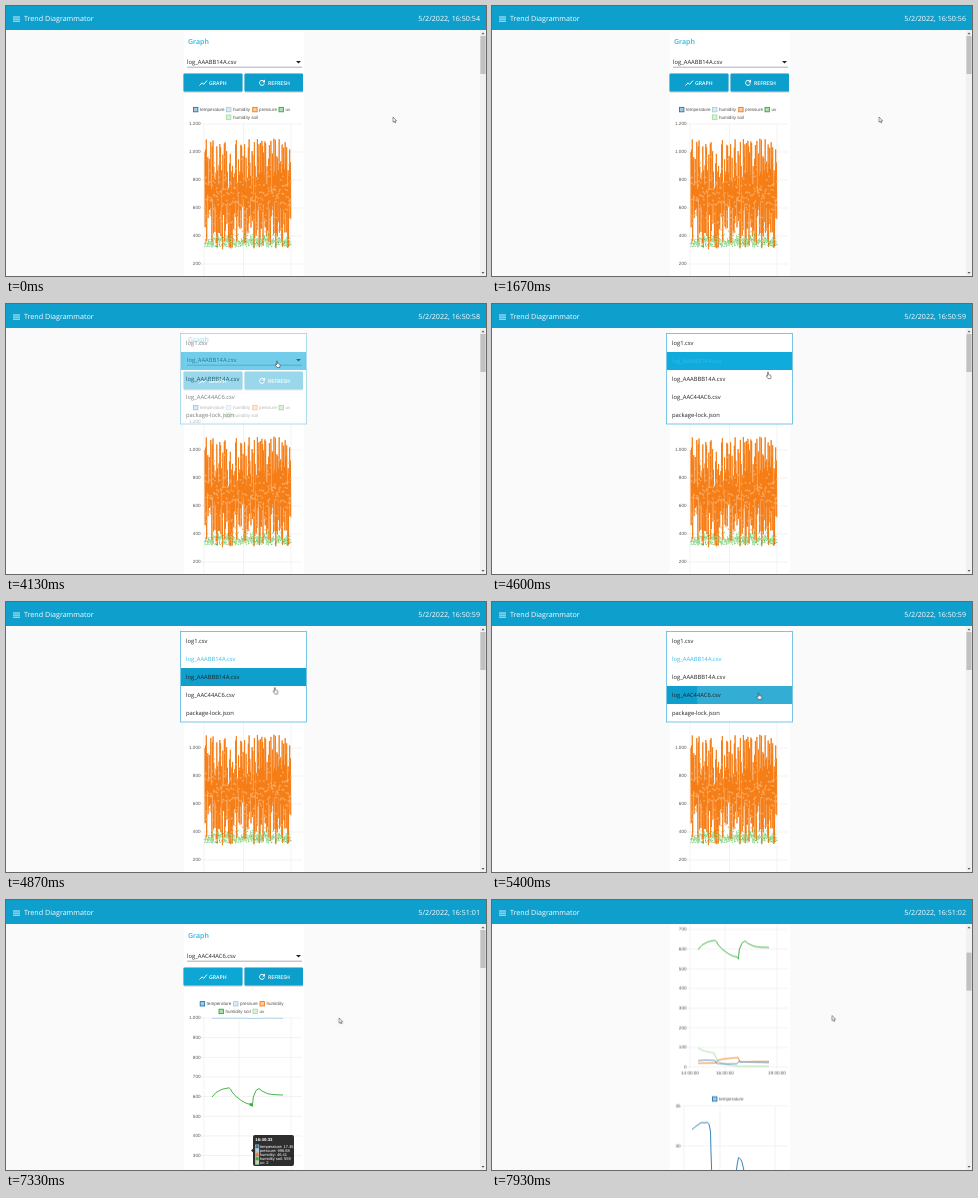
An HTML page for the animation above (8 s loop, 480 by 270 pixels).

```html
<!DOCTYPE html>
<html lang="en">
<head>
<meta charset="utf-8">
<title>Trend Diagrammator</title>
<style>
html, body { margin: 0; width: 480px; height: 270px; overflow: hidden; background: #fafafa; }
svg { display: block; overflow: hidden; }
text { font-family: "Open Sans", "Noto Sans", sans-serif; text-rendering: geometricPrecision; }
.bar { font-size: 7.15px; fill: #fff; }
.file { font-size: 5.8px; fill: #222; }
.btn { font-size: 5.2px; font-weight: 600; fill: #fff; }
.chart text { font: 4.6px "Liberation Sans", Arial, sans-serif; fill: #555; }
.chart .tip text { font-size: 4px; fill: #fff; }
.chart .tip .head { font-weight: bold; font-size: 4.3px; }
.grid { stroke: #e4e4e4; stroke-width: .5; fill: none; }
.line { fill: none; stroke-width: .9; stroke-linejoin: round; vector-effect: non-scaling-stroke; }
.icon { fill: none; stroke: #fff; stroke-width: 1; }

.clock, .menu, .mark, .before, .after, .first, .second, .oldName, .newName, .tip, .rise,
.page, .thumb, .pointer, .arrow, .hand, .graphBtn, .refreshBtn, .ripple, .rowRipple {
  animation-duration: 8s; animation-iteration-count: infinite; animation-timing-function: linear;
}
.clock { animation-name: clock; animation-timing-function: step-end; }
.before, .oldName { animation-name: before; animation-timing-function: step-end; }
.after { animation-name: after; animation-timing-function: step-end; }
.oldName { animation-name: oldName; }
.newName { animation-name: newName; animation-timing-function: step-end; }
.arrow { animation-name: arrow; animation-timing-function: step-end; }
.hand { animation-name: hand; animation-timing-function: step-end; }
.mark { animation-name: mark; animation-timing-function: step-end; }
.menu { animation-name: menu; }
.tip { animation-name: tip; }
.rise { animation-name: rise; transform-origin: 0 314.5px; }
.page { animation-name: page; }
.thumb { animation-name: thumb; }
.pointer { animation-name: pointer; }
.graphBtn { animation-name: graphBtn; }
.refreshBtn { animation-name: refreshBtn; }
.ripple { animation-name: ripple; transform-origin: 214px 76px; }
.rowRipple { animation-name: rowRipple; transform-origin: 267px 92px; }

@keyframes clock {
  0% { transform: translateY(0); }
  8.375% { transform: translateY(-24px); }
  20.875% { transform: translateY(-48px); }
  33.375% { transform: translateY(-72px); }
  45.875% { transform: translateY(-96px); }
  57.125% { transform: translateY(-120px); }
  70.875% { transform: translateY(-144px); }
  87.5% { transform: translateY(-168px); }
  95.875%, 100% { transform: translateY(-192px); }
}
@keyframes before { 0% { opacity: 1; } 83.4%, 100% { opacity: 0; } }
@keyframes after { 0% { opacity: 0; } 83.4%, 100% { opacity: 1; } }
@keyframes oldName { 0% { opacity: 1; } 68.75%, 100% { opacity: 0; } }
@keyframes newName { 0% { opacity: 0; } 68.75%, 100% { opacity: 1; } }
@keyframes arrow { 0% { opacity: 1; } 38% { opacity: 0; } 87%, 100% { opacity: 1; } }
@keyframes hand { 0% { opacity: 0; } 38% { opacity: 1; } 87%, 100% { opacity: 0; } }
@keyframes mark {
  0% { transform: translateY(0); fill: #0eabdc; }
  57.75% { transform: translateY(18px); fill: #0f9fcd; }
  61.6%, 100% { transform: translateY(36px); fill: #0f9fcd; }
}
@keyframes menu {
  0%, 50.4% { opacity: 0; } 52.5%, 68.75% { opacity: 1; } 71.2%, 100% { opacity: 0; }
}
@keyframes tip { 0%, 87.6% { opacity: 0; } 89%, 91.8% { opacity: 1; } 93.5%, 100% { opacity: 0; } }
@keyframes rise {
  0%, 83.4% { transform: scaleY(0); animation-timing-function: cubic-bezier(.165, .84, .44, 1); }
  91.5%, 100% { transform: scaleY(1); }
}
@keyframes page {
  0%, 93.4% { transform: translateY(0); animation-timing-function: cubic-bezier(.3, .3, .4, 1); }
  99.125% { transform: translateY(-147.5px); }
  100% { transform: translateY(-148.5px); }
}
@keyframes thumb {
  0%, 93.4% { transform: translateY(0); animation-timing-function: cubic-bezier(.3, .3, .4, 1); }
  99.125%, 100% { transform: translateY(22.6px); }
}
@keyframes pointer {
  0%, 32.5% { transform: translate(387px, 111px); animation-timing-function: ease-in-out; }
  39.2%, 45.9% { transform: translate(280px, 79px); animation-timing-function: ease-in-out; }
  49.2%, 56.5% { transform: translate(271px, 57px); }
  57.5% { transform: translate(276px, 68px); animation-timing-function: ease-out; }
  63.4%, 70% { transform: translate(266.5px, 91px); animation-timing-function: ease-in-out; }
  77.4%, 86% { transform: translate(214px, 75px); }
  88.4% { transform: translate(246px, 102px); animation-timing-function: ease-out; }
  91.6% { transform: translate(333px, 118px); }
  93.5%, 100% { transform: translate(340px, 115.5px); }
}
@keyframes refreshBtn {
  0%, 38.2% { fill: #109fcc; } 39.6%, 46.2% { fill: #14aedf; } 47.6%, 100% { fill: #109fcc; }
}
@keyframes graphBtn {
  0%, 76% { fill: #109fcc; } 77.4%, 87% { fill: #14aedf; } 89%, 100% { fill: #11a7d6; }
}
@keyframes ripple {
  0%, 77% { transform: scale(0); opacity: .28; }
  79% { transform: scale(1); opacity: .2; }
  83.4%, 100% { transform: scale(1); opacity: 0; }
}
@keyframes rowRipple {
  0%, 66.2% { transform: scale(0); opacity: .2; }
  68.2% { transform: scale(1); opacity: .13; }
  71%, 100% { transform: scale(1); opacity: 0; }
}
</style>
</head>
<body>
<svg width="480" height="270" viewBox="0 0 480 270">
  <defs>
    <clipPath id="graphClip"><rect x="177.5" y="67.5" width="59" height="18" rx="1"/></clipPath>
    <clipPath id="rowClip"><rect x="175" y="84" width="125" height="18"/></clipPath>
    <filter id="soft" x="-10%" y="-20%" width="120%" height="150%">
      <feDropShadow dx="0" dy=".6" stdDeviation=".7" flood-opacity=".35"/>
    </filter>
  </defs>
  <rect width="480" height="270" fill="#fafafa"/>

  <g class="page">
    <rect x="178" y="26" width="120" height="500" fill="#fff"/>
    <text x="182" y="38.3" font-size="7" font-weight="600" fill="#27b6e2">Graph</text>
    <text class="file oldName" x="181" y="58.2">log_AAABB14A.csv</text>
    <text class="file newName" x="181" y="58.2">log_AAC44AC6.csv</text>
    <path d="M181 61.2H296" stroke="#777" stroke-width=".6"/>
    <path d="M290 55h5l-2.5 2.6z" fill="#222"/>

    <g filter="url(#soft)">
      <rect class="graphBtn" x="177.5" y="67.5" width="59" height="18" rx="1"/>
      <rect class="refreshBtn" x="238.5" y="67.5" width="58.5" height="18" rx="1"/>
    </g>
    <g clip-path="url(#graphClip)"><circle class="ripple" cx="214" cy="76" r="42" fill="#fff"/></g>
    <path class="icon" d="M193.5 79.5l2.6-2.7 1.6 1.6 3.3-3.8"/>
    <text class="btn" x="203" y="78.6">GRAPH</text>
    <path class="icon" d="M257.9 75.2a2.5 2.5 0 1 0 .5 2.4"/>
    <path d="M259 73.6v2.8h-2.8z" fill="#fff"/>
    <text class="btn" x="262" y="78.6">REFRESH</text>

    <g class="chart before" id="before"></g>
    <g class="chart after" id="after">
      <g class="rise" id="rise"></g>
    </g>
  </g>

  <g class="menu">
    <rect x="174.5" y="29.5" width="126" height="90.5" fill="#fff" stroke="#58b9dc" stroke-width=".8"/>
    <rect class="mark" x="175" y="48" width="125" height="18"/>
    <g clip-path="url(#rowClip)"><circle class="rowRipple" cx="267" cy="92" r="95" fill="#fff"/></g>
    <g id="files"></g>
  </g>

  <rect x="474" y="24" width="6" height="246" fill="#f1f1f1"/>
  <rect class="thumb" x="474.4" y="30" width="5.2" height="38" fill="#c1c1c1"/>
  <path d="M475.5 28.3h3l-1.5-1.8zM475.5 266h3l-1.5 1.8z" fill="#555"/>

  <rect width="480" height="24" fill="#0f9fcd"/>
  <path d="M7 11h7M7 13.1h7M7 15.2h7" stroke="#fff" stroke-width=".8"/>
  <text class="bar" x="18" y="15.1">Trend Diagrammator</text>
  <svg x="400" width="80" height="24"><g class="clock" id="clock"></g></svg>

  <g class="pointer">
    <path class="arrow" d="M0 0v5.2l1.2-1.1.8 1.9.8-.4-.8-1.8h1.6z" fill="#fff" stroke="#333" stroke-width=".5"/>
    <path class="hand" d="M-.5 .2q.5-.6 1 0V2.6l2 .5q.7.2.6 1L2.7 6.5H.1L-1.7 4.1q0-.8.8-.4l.4.4z" fill="#fff" stroke="#222" stroke-width=".5"/>
  </g>
</svg>

<script>
const NS = "http://www.w3.org/2000/svg";
const $ = id => document.getElementById(id);
const BLUE = "#1f78b4", PALE_BLUE = "#a6cee3", ORANGE = "#f57c14", GREEN = "#35ac34", PALE_GREEN = "#a5dfa0";

function add(parent, tag, attrs, label) {
  const node = document.createElementNS(NS, tag);
  for (const key in attrs) node.setAttribute(key, attrs[key]);
  if (label !== undefined) node.textContent = label;
  parent.appendChild(node);
  return node;
}

function legend(parent, x, y, color, label) {
  add(parent, "rect", { x, y: y - 2.2, width: 4.4, height: 4.4, fill: color, "fill-opacity": .4, stroke: color, "stroke-width": .9 });
  add(parent, "text", { x: x + 6.4, y: y + 1.6 }, label);
}

function axes(parent, left, top, step, labels, columns, bottom) {
  labels.forEach((label, i) => {
    const y = top + i * step;
    add(parent, "path", { class: "grid", d: `M${left - 3} ${y}H296` });
    add(parent, "text", { x: left - 3.5, y: y + 1.4, "text-anchor": "end" }, label);
  });
  for (const x of [left, ...columns])
    add(parent, "path", { class: "grid", d: `M${x} ${top}V${bottom}` });
}

const polyline = (parent, color, points) =>
  add(parent, "polyline", { class: "line", stroke: color, points });

// Clock and file list
for (let i = 0; i < 9; i++) {
  const s = 54 + i, time = `16:${50 + Math.floor(s / 60)}:${String(s % 60).padStart(2, "0")}`;
  add($("clock"), "text", { class: "bar", x: 74, y: 15.1 + 24 * i, "text-anchor": "end" }, `5/2/2022, ${time}`);
}
["log1.csv", "log_AAABB14A.csv", "log_AAABBB14A.csv", "log_AAC44AC6.csv", "package-lock.json"].forEach((name, i) => {
  const row = add($("files"), "text", { class: "file", x: 180, y: 41.2 + 18 * i }, name);
  if (i === 1) row.style.fill = "#35bde8";
});

// Dense first chart
let seed = 11;
const rand = () => (seed = (seed * 16807) % 2147483647) / 2147483647;
const before = $("before");
legend(before, 187.5, 103.6, BLUE, "temperature");
legend(before, 220.5, 103.6, PALE_BLUE, "humidity");
legend(before, 246.7, 103.6, ORANGE, "pressure");
legend(before, 273, 103.6, GREEN, "uv");
legend(before, 220.5, 111.2, PALE_GREEN, "humidity soil");
axes(before, 198, 118, 28, ["1.200", "1.000", "800", "600", "400", "200"], [237.5, 285], 286);

const oldY = v => 286 - v * .14;
const spread = (n, value) => Array.from({ length: n }, (_, i) => [198.8 + 86 * i / (n - 1), oldY(value())]);
const dots = (points, color, r, opacity) =>
  points.forEach(([cx, cy]) => add(before, "circle", { cx, cy, r, fill: color, opacity }));
const soil = spread(170, () => 320 + 65 * rand() + 35 * rand() ** 4);
const uv = spread(170, () => 325 + 90 * rand() ** 1.5);
polyline(before, PALE_GREEN, soil.join(" "));
let high = false;
const pressure = spread(230, () => {
  high = !high;
  return high ? 1095 - 420 * rand() ** 1.5 : 305 + 420 * rand() ** 1.2;
});
polyline(before, ORANGE, pressure.join(" "));
dots(spread(240, () => 390 + 580 * (rand() + rand()) / 2), "#fbb06c", .95, .8);
dots(uv, GREEN, .5, .75);
dots(soil, PALE_GREEN, .55, .7);

// Second chart
const after = $("after"), rise = $("rise");
legend(after, 194.2, 103.8, BLUE, "temperature");
legend(after, 227.6, 103.8, PALE_BLUE, "pressure");
legend(after, 254, 103.8, ORANGE, "humidity");
legend(after, 213, 111.4, GREEN, "humidity soil");
legend(after, 247, 111.4, PALE_GREEN, "uv");
axes(after, 198, 118, 19.65, ["1.000", "900", "800", "700", "600", "500", "400", "300", "200", "100", "0"], [233, 285], 317);
[[198, "14:00:00"], [233, "16:00:00"], [285, "19:00:00"]].forEach(([x, label]) =>
  add(after, "text", { x, y: 322, "text-anchor": "middle" }, label));
after.appendChild(rise);

polyline(rise, PALE_GREEN, "206,295.5 212,298.5 222,300.5 225,307.5 229,310.5 236,312.5 248,313.8 277,313.8");
polyline(rise, GREEN, "206,197 210,192.5 216,189.3 223,187.8 224.5,189 226,192 230,196.5 236,201 241,203.6 245,204.4 246.3,206.5 247.3,197 250,190.5 253,188.5 256,191 262,193.8 268,194.7 277,195");
polyline(rise, ORANGE, "206,310.8 224,310.5 226,307.5 234,306.2 246,305 248,309.6 260,309.2 277,309");
polyline(rise, PALE_BLUE, "206,118.3 238,118.2 246,118.6 260,118.2 277,118.3");
polyline(rise, BLUE, "206,308.2 214,307.6 223,308 225,311 234,311.4 245,311.2 247,309 250,309.4 277,310");
rise.lastChild.setAttribute("opacity", ".8");

// Temperature chart below
legend(after, 220.5, 346.5, BLUE, "temperature");
axes(after, 192, 353.3, 40.2, ["35", "30", "25"], [228, 283], 460);
polyline(after, BLUE, "200,377 203,374.5 207,371.5 210,370 213,370.4 215,369.8 217,371.5 218.5,379 219,400 220,428 243,432 245,413 246.5,405 248.5,406.5 250,409.5 251.5,416 254,430");

// Tooltip
const tip = add(after, "g", { class: "tip" });
add(tip, "circle", { cx: 245, cy: 204.4, r: 1.5, fill: GREEN });
add(tip, "path", { d: "M245 250.5l2.2-2v4z", fill: "#000", opacity: .8 });
add(tip, "rect", { x: 247, y: 235, width: 41, height: 31, rx: 2, fill: "#000", opacity: .82 });
add(tip, "text", { class: "head", x: 249.3, y: 241.2 }, "16:40:33");
[[BLUE, "temperature: 17.45"], [PALE_BLUE, "pressure: 998.88"], [ORANGE, "humidity: 46.41"],
 [GREEN, "humidity soil: 559"], [PALE_GREEN, "uv: 2"]].forEach(([color, label], i) => {
  const y = 246.6 + 4 * i;
  add(tip, "rect", { x: 249.5, y: y - 1.7, width: 3.4, height: 3.4, fill: color, stroke: "#fff", "stroke-width": .4 });
  add(tip, "text", { x: 253.8, y: y + 1.4 }, label);
});
</script>
</body>
</html>
```
